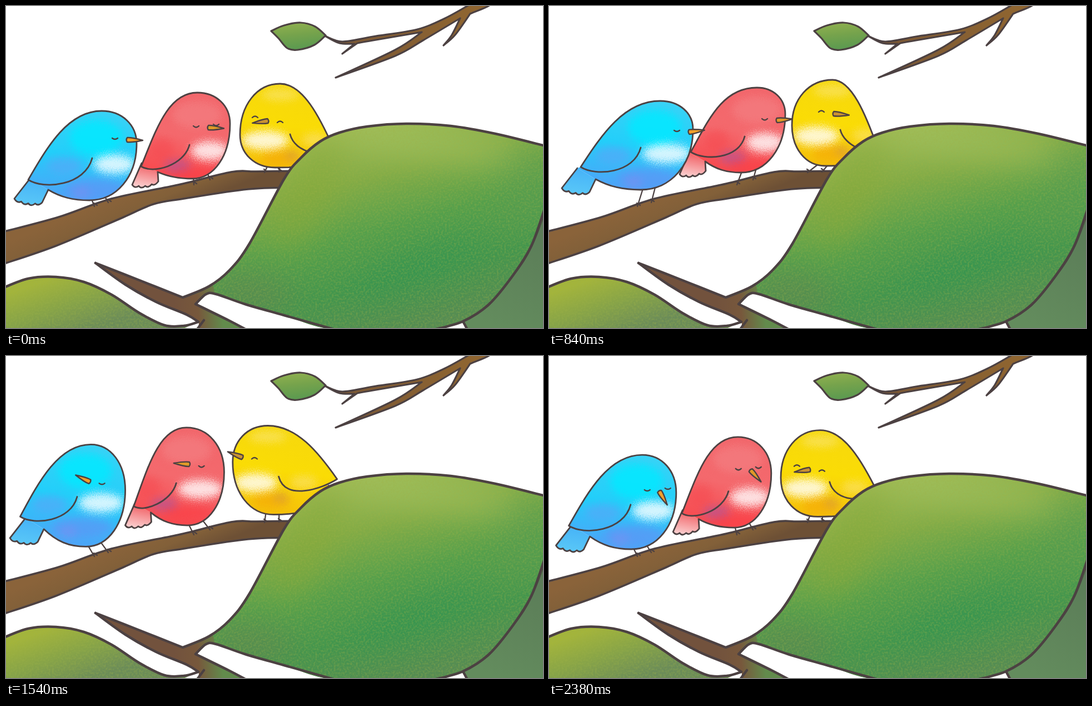
Recreate the animation shown at these times as an HTML page. Size 966 px wide and 580 px high, loop 2.52 s.

```html
<!DOCTYPE html>
<html lang="en">
<head>
<meta charset="utf-8">
<title>Three birds on a branch</title>
<style>
  html, body { margin: 0; width: 100%; height: 100%; overflow: hidden; background: #fff; }
  svg { display: block; width: 100%; height: 100%; }
  .ink { stroke: #4c4142; stroke-linecap: round; stroke-linejoin: round; }
</style>
</head>
<body>
<svg viewBox="0 0 966 580" preserveAspectRatio="none">
  <defs id="defs">
    <filter id="spray" filterUnits="userSpaceOnUse" x="0" y="90" width="660" height="310" color-interpolation-filters="sRGB">
      <feGaussianBlur in="SourceGraphic" stdDeviation="7" result="soft"/>
      <feTurbulence type="fractalNoise" baseFrequency=".7" numOctaves="1" seed="4" result="noise"/>
      <feDisplacementMap in="soft" in2="noise" scale="26" xChannelSelector="R" yChannelSelector="G"/>
    </filter>
    <filter id="blur" filterUnits="userSpaceOnUse" x="-100" y="-100" width="1200" height="800" color-interpolation-filters="sRGB">
      <feGaussianBlur stdDeviation="28"/>
    </filter>
    <filter id="grain" filterUnits="userSpaceOnUse" x="0" y="0" width="966" height="580" color-interpolation-filters="sRGB">
      <feTurbulence type="fractalNoise" baseFrequency=".3" numOctaves="2" seed="9"/>
      <feColorMatrix values="0 0 0 0 .62  0 0 0 0 .7  0 0 0 0 .28  .9 0 0 0 -.36"/>
    </filter>
  </defs>
  <g id="back"></g>
  <g id="birds"></g>
  <g id="front"></g>
</svg>
<script>
const byId = id => document.getElementById(id);
const nums = s => s.trim().split(/[\s,]+/).map(Number);
const plus = (p, q) => [p[0] + q[0], p[1] + q[1]];
const mix = (p, q, k) => p.map((v, i) => v + (q[i] - v) * k);
const polar = (r, deg) => [r * Math.cos(deg * Math.PI / 180), r * Math.sin(deg * Math.PI / 180)];

function set(el, attrs) {
  for (const k in attrs) el.setAttribute(k, attrs[k]);
  return el;
}
function add(parent, tag, attrs = {}) {
  return parent.appendChild(set(document.createElementNS('http://www.w3.org/2000/svg', tag), attrs));
}
const inkPath = (g, fill, width, d = '') => add(g, 'path', { d, class: 'ink', fill, 'stroke-width': width });

function gradient(id, colors, x1, y1, x2, y2, units = 'objectBoundingBox') {
  const g = add(byId('defs'), 'linearGradient', { id, x1, y1, x2, y2, gradientUnits: units });
  colors.forEach((c, i) => add(g, 'stop', { offset: i / (colors.length - 1), 'stop-color': c }));
  return `url(#${id})`;
}
const wash = (id, colors, ...ends) => gradient(id, colors, ...ends, 'userSpaceOnUse');
const clipPath = (id, d = '') => add(add(byId('defs'), 'clipPath', { id }), 'path', { d });
const blob = (g, [cx, cy], rx, ry, fill, opacity, turn = 0) =>
  add(g, 'ellipse', { cx, cy, rx, ry, fill, opacity, transform: `rotate(${turn} ${cx} ${cy})` });

// Smooth curves through the given points; "/" marks a corner
function trace(text) {
  let last = null, d = '';
  for (const piece of text.split('/')) {
    const c = nums(piece), pts = last ? [last] : [];
    for (let i = 0; i < c.length; i += 2) pts.push([c[i], c[i + 1]]);
    const at = i => pts[Math.max(0, Math.min(pts.length - 1, i))];
    if (!last) d = `M${pts[0]}`;
    for (let i = 0; i < pts.length - 1; i++) {
      const handle = (p, from, to, sign) => p.map((v, j) => v + sign * (to[j] - from[j]) / 6);
      d += `C${handle(at(i), at(i - 1), at(i + 1), 1)} ${handle(at(i + 1), at(i), at(i + 2), -1)} ${at(i + 1)}`;
    }
    last = pts[pts.length - 1];
  }
  return d;
}

/* Scenery */
function drawBack() {
  const g = byId('back');
  const twig = wash('twig', ['#7b5835', '#8f6530'], 600, 60, 840, 10);
  const bark = wash('bark', ['#8a633a', '#826039', '#6d5035'], 220, 335, 245, 395);
  const leaf = gradient('small', ['#93b24f', '#76a34c', '#5c9a50'], 0, 0, .2, 1);
  inkPath(g, twig, 3.2, trace(`574,54 605,64 660,55 740,42 790,22 835,-3 / 872,-3 835,14 / 808,52 787,71 / 802,52 817,22 /
    750,62 700,90 593,129 / 700,79 748,47 / 660,62 632,67 / 605,86 / 627,68 / 600,67 574,54`));
  inkPath(g, leaf, 3.2, trace('477,45 500,35 530,30 556,37 575,53 / 555,70 525,79 506,76 490,58 477,45'));
  inkPath(g, bark, 3.6, trace(`-6,407 95,380 190,347 310,322 405,299 450,298 530,297 / 520,327 /
    435,330 320,347 265,357 210,381 90,432 -6,465`));
}

function leafShape(g, id, d, fill, tints) {
  clipPath(id, d);
  const inside = add(g, 'g', { 'clip-path': `url(#${id})` });
  add(inside, 'path', { d, fill });
  const soft = add(inside, 'g', { filter: 'url(#blur)' });
  for (const t of tints) blob(soft, ...t);
  add(inside, 'rect', { width: 966, height: 580, filter: 'url(#grain)' });
}

function drawFront() {
  const g = byId('front');
  const upper = '318,526 365,505 402,476 438,428 500,312 530,274 565,244 600,228 650,217 720,212 800,216 880,230 970,252';
  const fold = '970,362 945,432 912,485 868,538 822,568 770,583';
  const under = '592,583 500,557 430,537 378,519 360,519 341,537';
  const low = '346,569 320,576 285,575 240,553 190,520 140,497 90,488 40,491 -6,508';
  const thorn = '161,463 240,494 318,525', thornUnder = '161,463 215,502 270,533 325,556 346,569';

  inkPath(g, wash('fold', ['#5b7c58', '#638c5d'], 966, 400, 880, 580), 4.5,
    trace('980,340 945,432 912,485 868,538 822,568 / 834,590 / 990,590'));
  leafShape(g, 'leaf', trace(`${upper} / ${fold} / ${under}`),
    wash('leafFill', ['#9fbb55', '#83ac47', '#55a04c', '#43964e', '#558c53'], 640, 215, 735, 580), [
      [[540, 340], 45, 110, '#86a83a', .6, 25],
      [[770, 250], 160, 24, '#a8c666', .6, 6],
      [[440, 520], 80, 35, '#5d8850', .8, 10],
      [[740, 470], 130, 32, '#2f9452', .6, -22],
      [[940, 330], 50, 80, '#5a9c50', .5, 15]
    ]);
  leafShape(g, 'lowLeaf', trace(`${low} / -6,590 / 300,590`),
    wash('lowFill', ['#a3b43b', '#86a348', '#6b8c58'], 90, 488, 125, 590), []);
  add(g, 'path', {
    d: trace(`${thorn} / 345,517 372,500 / 374,518 358,519 341,537 / 400,566 434,584 / 343,584 /
      346,569 325,556 270,533 215,502 161,463`),
    fill: wash('stem', ['#72523d', '#77583c', '#628b4c'], 300, 515, 385, 508)
  });
  for (const line of [`${thorn} / ${upper.slice(8)}`, fold, `${under} / 400,566 434,584`,
    `${thornUnder} / ${low.slice(8)}`, '356,566 344,582']) inkPath(g, 'none', 4.5, trace(line));
}

/* Birds. Key points of each pose: belly, breast, crown, wing tip, wing end, tail corner.
   Faces: beak base from the crown, beak angle, and 1 where both eyes show. */
const names = ['belly', 'breast', 'crown', 'tip', 'wing', 'tail'];
const birds = [
  {
    name: 'yellow', fills: ['#f6d80e', '#fadc05', '#f5bf0a'], tails: ['#f2b90a', '#f2b90a'], beak: '#c99233',
    rest: '484,291 421,232 493,140 591,260 511,231 620,280',
    lean: '497,288 437,215 510,133 592,258 524,223 620,280',
    stretch: '480,283 401,170 453,126 598,202 480,210 602,264',
    faces: { rest: [-22, 67, 172, 1], lean: [2, 61, 5], turn: [-19, 71, 171, 1],
      look: [-43, 60, 174], rise: [-46, 57, 201], stretch: [-44, 49, 214] },
    root: [-28, -36], rump: [-50, 5], fan: [-20, 15], back: .42, sag: -5, farEye: 23,
    hips: [-14, 10], toes: [[465, 300], [491, 299]],
    blobs: [['crown', 0, 20, 34, 10, '#fbe77e', .6], ['patch', 28, 32, 34, 15, '#f6ae08', .8],
      ['wing', 4, 38, 14, 10, '#d09a4a', .5], ['wing', 45, 10, 24, 12, '#fbe58a', .5]]
  },
  {
    name: 'red', fills: ['#f2666b', '#f4696d', '#f8474c'], tails: ['#f0595e', '#fbd0d0'], beak: '#e09a27',
    rest: '335,311 403,212 344,156 243,289 330,250 227,322',
    lean: '345,300 425,195 374,147 255,263 352,235 235,303',
    stretch: '322,302 387,208 308,123 223,261 294,218 208,296',
    faces: { rest: [20, 63, 3, 1], lean: [36, 59, -5], turn: [23, 60, 48, 1],
      look: [3, 59, 164], rise: [5, 66, 184], stretch: [0, 61, 198] },
    root: [17, -39], rump: [46, -23], fan: [47, -6], back: .52, sag: 5, farEye: 14,
    hips: [2, 28], toes: [[338, 322], [367, 313]],
    blobs: [['crown', 0, 40, 45, 25, '#f48285', .6], ['wing', -22, 38, 24, 12, '#b0559a', .65],
      ['wing', -50, 8, 22, 20, '#f5484f', .5], ['patch', -20, 42, 45, 12, '#fb3a42', .5]]
  },
  {
    name: 'blue', fills: ['#3ad2f6', '#22cffa', '#4fa2f8'], tails: ['#45b2f8', '#5ac8f7'], beak: '#f0a02c',
    rest: '150,350 235,248 172,189 40,313 155,274 15,347',
    lean: '165,331 259,222 200,171 57,290 165,255 23,328',
    stretch: '140,340 204,238 136,152 18,277 114,243 3,318',
    faces: { rest: [46, 52, 2], lean: [52, 56, -7], turn: [31, 66, 60, 1],
      look: [1, 65, 166], rise: [-2, 67, 205], stretch: [-12, 53, 208] },
    root: [28, -36], rump: [61, -16], fan: [50, 7], back: .45, sag: 4, farEye: 15,
    hips: [4, 27], toes: [[159, 361], [184, 354]], farWing: true,
    blobs: [['crown', -10, 48, 48, 32, '#00eaff', .8], ['wing', -50, 14, 32, 16, '#5aa6f7', .6],
      ['patch', -35, 44, 55, 18, '#658ff5', .55], ['patch', -60, 52, 16, 12, '#7f8df2', .5]]
  }
];

// Sway runs from -1 (stretched left) over 0 (at rest) to 1 (leaning right) and beyond
function poseAt(bird, sway) {
  const target = sway < 0 ? bird.stretch : bird.lean, p = {};
  for (const n of names) p[n] = mix(bird.rest[n], target[n], Math.abs(sway));
  if (sway < 0) {
    const perk = Math.sin(-sway * Math.PI);
    p.crown = plus(p.crown, [5 * perk, -6 * perk]);
  }
  p.root = plus(p.tail, bird.root);
  p.rump = plus(p.tail, bird.rump);
  p.patch = plus(mix(p.wing, p.breast, .5), [0, 0]);
  p.patch[1] = p.wing[1] + 11;
  return p;
}

const cubic = (a, b, c) => `C${a} ${b} ${c}`;
const round = .58;

function bodyPath({ rump, belly, breast, crown, tip, wing }, back) {
  const span = wing[0] - tip[0];
  const toward = (p, q, fx, fy) => [p[0] + (q[0] - p[0]) * fx, p[1] + (q[1] - p[1]) * fy];
  return cubic(toward(rump, belly, .3, .7), toward(belly, rump, .4, 0), belly) +
    cubic(toward(belly, breast, round, 0), toward(breast, belly, 0, round), breast) +
    cubic(toward(breast, crown, 0, round), toward(crown, breast, round, 0), crown) +
    cubic(toward(crown, tip, back, 0), toward(tip, crown, .27, .5), tip) +
    cubic(plus(tip, [span * .25, Math.abs(span) * .16]), plus(wing, [-span * .11, Math.abs(span) * .43]), wing);
}

function tailPath({ root, tail, rump }, fan) {
  const end = plus(tail, fan), count = 4;
  const edge = k => plus(mix(tail, end, k), [0, 5 * Math.sin(k * Math.PI)]);
  let d = `M${root}L${tail}`;
  for (let i = 0; i < count; i++) d += `Q${plus(edge((i + .5) / count), [-1, 6])} ${edge((i + 1) / count)}`;
  return d + `L${rump}`;
}

function beakPath(base, tip, angle) {
  const side = polar(4, angle + 90), bulge = k => plus(mix(base, tip, .3), [side[0] * k, side[1] * k]);
  const a = plus(base, side), b = plus(base, [-side[0], -side[1]]);
  return `M${a}Q${bulge(1.2)} ${tip}Q${bulge(-1.2)} ${b}Q${mix(base, tip, -.1)} ${a}Z`;
}

const eyePath = (at, sag) => `M${plus(at, [-5, 0])}q5,${sag} 10,0`;

function buildBird(bird) {
  for (const key of ['rest', 'lean', 'stretch']) {
    const c = nums(bird[key]);
    bird[key] = Object.fromEntries(names.map((n, i) => [n, c.slice(i * 2, i * 2 + 2)]));
  }
  const g = add(byId('birds'), 'g'), el = bird.el = {}, id = bird.name;
  if (bird.farWing) el.far = inkPath(g, '#4e83ee', 2.8);
  el.legs = inkPath(g, 'none', 2.3);
  el.tail = inkPath(g, gradient(id + 'Tail', bird.tails, .6, 0, .4, 1), 2.8);
  el.fill = add(g, 'path', { fill: gradient(id + 'Body', bird.fills, .55, 0, .4, 1) });
  el.clip = clipPath(id + 'Clip');
  const spray = add(add(g, 'g', { 'clip-path': `url(#${id}Clip)` }), 'g', { filter: 'url(#spray)' });
  el.blobs = bird.blobs.map(([, , , ...look]) => blob(spray, [0, 0], ...look));
  el.patch = blob(spray, [0, 0], 1, 1, '#fff', .8);
  el.line = inkPath(g, 'none', 2.8);
  el.eyes = inkPath(g, 'none', 2.4);
  el.beak = inkPath(g, bird.beak, 2.4);
}

function drawBird(bird, sway, look) {
  const { el } = bird, p = poseAt(bird, sway), body = bodyPath(p, bird.back);
  set(el.line, { d: `M${p.rump}${body}` });
  for (const part of [el.fill, el.clip]) set(part, { d: `M${p.root}L${p.rump}${body}Z` });
  set(el.tail, { d: tailPath(p, bird.fan) });
  if (el.far) {
    const [x, y] = p.breast;
    set(el.far, { d: look === 'stretch' ? `M${x - 2},${y + 4}L${x + 20},${y + 52}Q${x + 10},${y + 58} ${x - 3},${y + 56}Z` : '' });
  }
  set(el.legs, {
    d: bird.toes.map((toe, i) =>
      `M${plus(p.belly, [bird.hips[i], i ? -8 : -2])}L${toe}M${plus(toe, [-1, -6])}l6,4`).join('')
  });

  const [dx, dy, angle, front] = bird.faces[look];
  const base = plus(p.crown, [dx, dy]), beak = polar(28, angle), side = Math.sign(beak[0]);
  set(el.beak, { d: beakPath(base, plus(base, beak), angle) });
  const near = eyePath(plus(base, [-side * 22, side < 0 ? 3 : -3]), bird.sag);
  const far = front ? eyePath(plus(base, [side * bird.farEye, -6]), bird.sag) : '';
  set(el.eyes, { d: near + far });

  set(el.patch, { cx: p.patch[0], cy: p.patch[1], rx: Math.abs(p.breast[0] - p.wing[0]) * .47, ry: 17 });
  bird.blobs.forEach(([anchor, x, y], i) => {
    const [cx, cy] = plus(p[anchor], [x, y]);
    set(el.blobs[i], { cx, cy });
  });
}

/* Timeline: start ms, sway, look */
const loop = 2520;
const steps = [
  [0, 0, 'rest'], [70, .35, 'rest'], [140, .65, 'lean'], [280, 1, 'lean'], [350, 1.55, 'lean'],
  [420, 1.9, 'lean'], [840, 1, 'lean'], [910, .65, 'lean'], [980, .35, 'rest'], [1120, 0, 'rest'],
  [1260, -.2, 'turn'], [1400, -.38, 'look'], [1470, -.52, 'look'], [1540, -.66, 'rise'],
  [1680, -1, 'stretch'], [2100, -.66, 'rise'], [2240, -.52, 'rise'], [2310, -.38, 'look'], [2380, -.2, 'turn']
];
let shown = null;

function tick() {
  const t = performance.now() % loop;
  const step = steps.filter(s => s[0] <= t).pop();
  if (step !== shown) {
    for (const bird of birds) drawBird(bird, step[1], step[2]);
    shown = step;
  }
  requestAnimationFrame(tick);
}

drawBack();
birds.forEach(buildBird);
drawFront();
tick();
</script>
</body>
</html>
```
